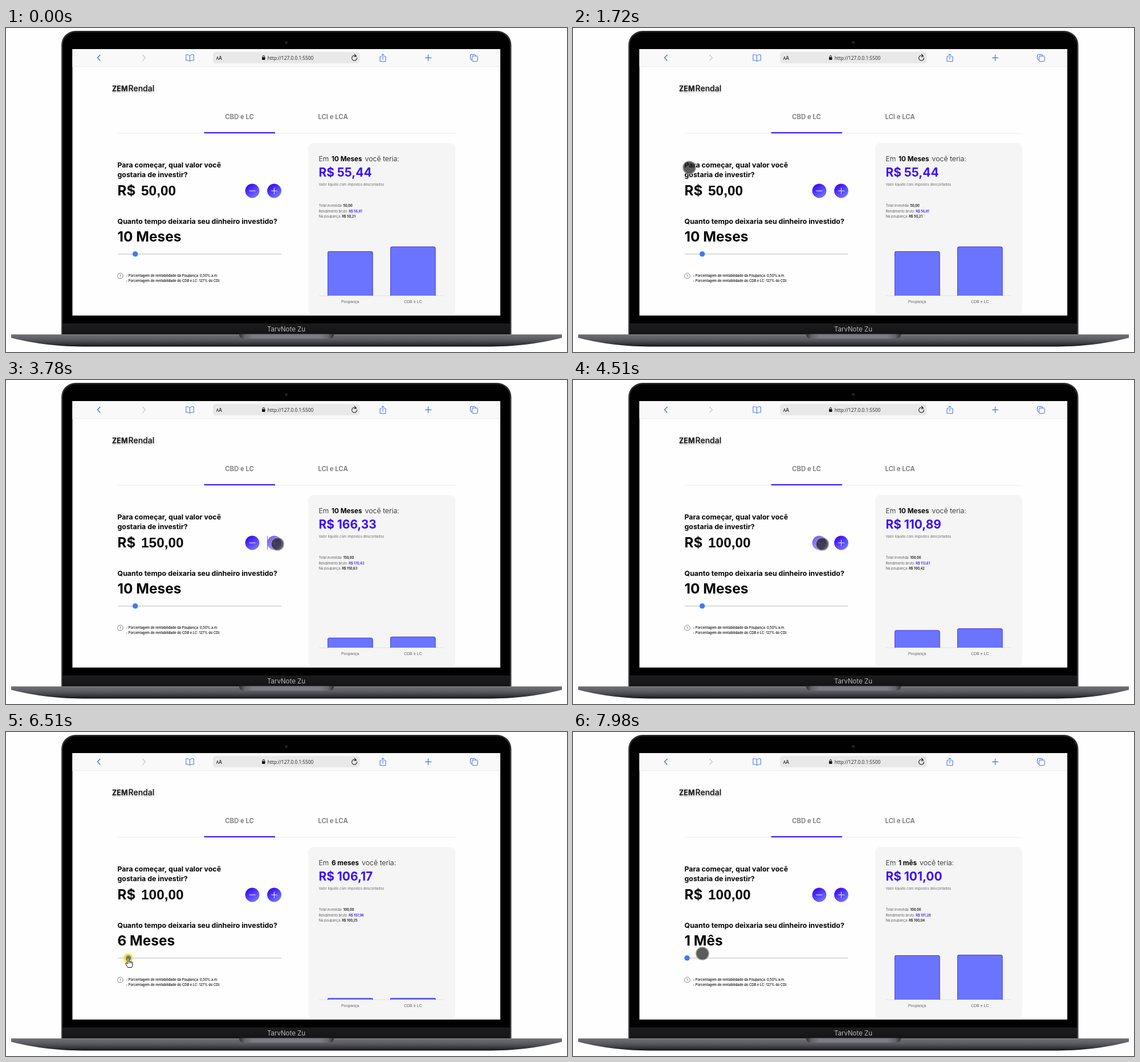
Animation, 984 px wide and 569 px high, one loop 8 s. Source, as an HTML page with a canvas:

```html
<!DOCTYPE html>
<html lang="pt-BR">
<head>
<meta charset="utf-8">
<title>Simulador de investimentos</title>
<style>
  html, body { margin: 0; width: 100%; height: 100%; overflow: hidden; background: #fefefe; }
  canvas { display: block; width: 984px; height: 569px; }
</style>
</head>
<body>
<canvas id="stage" width="984" height="569"></canvas>
<script>
const ctx = document.getElementById('stage').getContext('2d');
const LOOP = 8000;
const VIOLET = '#3c0cff', BLUE = '#3f6fe8', INK = '#050505';
const SANS = 'Inter, sans-serif', ARIAL = '"Liberation Sans", Arial, sans-serif';

// ---------- drawing helpers ----------
function text(str, x, y, size, weight = 400, color = INK, family = SANS, align = 'left') {
  ctx.font = `${weight} ${size}px ${family}`;
  ctx.fillStyle = color;
  ctx.textAlign = align;
  ctx.fillText(str, x, y);
  return x + ctx.measureText(str).width;
}

function box(x, y, w, h, r, fill) {
  ctx.beginPath();
  ctx.roundRect(x, y, w, h, r);
  ctx.fillStyle = fill;
  ctx.fill();
}

function disc(x, y, r, fill) {
  ctx.beginPath();
  ctx.arc(x, y, r, 0, Math.PI * 2);
  ctx.fillStyle = fill;
  ctx.fill();
}

function stroke(path, color, width = 1) {
  ctx.strokeStyle = color;
  ctx.lineWidth = width;
  ctx.stroke(new Path2D(path));
}

function gradient(x0, y0, x1, y1, ...stops) {
  const g = ctx.createLinearGradient(x0, y0, x1, y1);
  stops.forEach(([at, color]) => g.addColorStop(at, color));
  return g;
}

// ---------- timeline ----------
const valueChanges = [[2880, 100], [3720, 150], [4394, 100]];
const DRAG_START = 6150, STEP = 88, FIRST_MONTH = 10;
const HAND_ON = 6000, HAND_OFF = 7900;

// time, x, y
const pointerPath = [
  [190, 923, 542], [1600, 204, 245], [1860, 204, 245], [2600, 490, 300],
  [2780, 476, 288], [3900, 476, 288], [4250, 437, 288], [4850, 437, 288],
  [5560, 234, 400], [5650, 234, 400], [5950, 225, 397], [6150, 225, 397],
  [6942, 201, 397], [7890, 201, 397], [7910, 201, 403], [7975, 227, 389]
];

function pointerAt(t) {
  if (t < pointerPath[0][0]) return null;
  const i = pointerPath.findIndex(p => p[0] > t);
  if (i < 0) return pointerPath.at(-1).slice(1);
  const [t0, x0, y0] = pointerPath[i - 1], [t1, x1, y1] = pointerPath[i];
  const k = (t - t0) / (t1 - t0);
  return [x0 + (x1 - x0) * k, y0 + (y1 - y0) * k];
}

function stateAt(t) {
  let value = 50, chartStart = -1000;
  for (const [at, v] of valueChanges) if (t >= at) { value = v; chartStart = at; }
  const steps = Math.max(0, Math.min(9, Math.floor((t - DRAG_START) / STEP)));
  if (steps) chartStart = DRAG_START + steps * STEP;
  const months = FIRST_MONTH - steps;
  const gross = value * 1.012842 ** months;
  const tax = months > 6 ? 0.2 : 0.225;
  const rest = 1 - Math.min(1, (t - chartStart) / 1000);
  return {
    value, months, gross,
    net: value + (gross - value) * (1 - tax),
    savings: value * (1 + 0.005 / 12) ** months,
    grow: 1 - rest ** 4
  };
}

const money = n => n.toFixed(2).replace('.', ',');
const monthWord = (n, one, many) => `${n} ${n === 1 ? one : many}`;

// ---------- laptop ----------
function drawLaptop() {
  box(97, 5, 789.5, 536, [25, 25, 0, 0], gradient(97, 0, 887, 0,
    [0, '#55555a'], [0.004, '#2a2a2d'], [0.996, '#2a2a2d'], [1, '#55555a']));
  box(99.5, 7.5, 784.5, 533, [23, 23, 0, 0], '#010101');
  disc(491.5, 25.5, 2.8, '#17181c');
  disc(491.5, 25.5, 1.2, '#272a35');
  box(99.5, 519, 784.5, 19, 0, gradient(0, 519, 0, 538, [0, '#1c1c1d'], [1, '#141415']));
  text('TarvNote Zu', 491.5, 532.5, 11.5, 400, '#b9b9bb', SANS, 'center');

  ctx.fillStyle = gradient(0, 538, 0, 559.5, [0, '#8b8b91'], [0.08, '#6b6b72'],
    [0.35, '#5f5f66'], [0.6, '#4a4a51'], [0.85, '#2b2b30'], [1, '#111113']);
  ctx.fill(new Path2D('M9 538H975V544C940 553 900 559 850 559.5H134C84 559 44 553 9 544Z'));
  box(409, 537.5, 166, 8, [0, 0, 7, 7], gradient(409, 0, 575, 0,
    [0, '#2f2f33'], [0.06, '#66666c'], [0.15, '#7c7c83'], [0.85, '#7c7c83'],
    [0.94, '#66666c'], [1, '#2f2f33']));
}

// ---------- browser ----------
function drawToolbar() {
  box(116.5, 37, 750.5, 31, 0, '#f9f9f9');
  box(116.5, 67.5, 750.5, 0.8, 0, '#e6e6e7');
  ctx.lineCap = ctx.lineJoin = 'round';
  stroke('M165 47.5L160.5 52.3L165 57', BLUE, 1.4);
  stroke('M240 47.5L244.5 52.3L240 57', '#c4c4c8', 1.2);
  stroke('M322.5 48.5C320 46.5 317.5 46.7 315.8 47V57C318 56.6 320.5 56.8 322.5 58.3C324.5 56.8 327 56.6 329.2 57V47C327.5 46.7 325 46.5 322.5 48.5V58', BLUE);
  box(363, 42, 257.5, 20, 5, '#e8e8e9');
  text('A', 368.5, 56, 7, 500, '#222');
  text('A', 373, 56, 8.6, 500, '#222');
  box(449, 51.3, 5.6, 4.8, 1, '#111');
  stroke('M450.2 51.3V50.2A1.6 1.8 0 0 1 453.4 50.2V51.3', '#111', 1);
  text('http://127.0.0.1:5500', 458.7, 55.8, 8.3, 400, '#222', '"Open Sans", sans-serif');
  stroke('M614.5 49.8A4.5 4.5 0 1 0 615.6 52.6M611.5 46.2L614.6 49.6L611 50.4', '#222', 1.1);
  stroke('M658.5 50.2H656V58.8H666V50.2H663.5M661 55V46M658.4 48.3L661 45.7L663.6 48.3', BLUE);
  stroke('M735.3 52.3H745.7M740.5 47.1V57.5', BLUE, 1.2);
  stroke('M816.5 55.5H815.6Q814.5 55.5 814.5 54.3V47.9Q814.5 46.6 815.8 46.6H822.2Q823.4 46.6 823.4 47.9V49', BLUE);
  stroke('M819 49.2H825.5Q827.2 49.2 827.2 50.8V57Q827.2 58.6 825.5 58.6H819Q817.4 58.6 817.4 57V50.8Q817.4 49.2 819 49.2Z', BLUE);
}

function drawHeader() {
  ctx.shadowColor = 'rgba(0,0,0,.35)';
  ctx.shadowBlur = 2;
  ctx.shadowOffsetY = 2;
  const end = text('ZEM', 186, 111, 12.5, 700, '#111');
  text('Rendal', end + 1, 111, 14, 500, '#111');
  ctx.shadowColor = 'transparent';

  text('CBD e LC', 409.5, 160, 11.3, 600, '#777', SANS, 'center');
  text('LCI e LCA', 573.5, 160, 11.3, 600, '#777', SANS, 'center');
  box(196, 184.5, 592, 1, 0, '#efefef');
  box(347.5, 183, 124.5, 2, 0, VIOLET);
}

function drawButton(x, y, isPlus, pointer) {
  const hovered = pointer && Math.hypot(pointer[0] - x, pointer[1] - y) < 13;
  ctx.globalAlpha = hovered ? 0.65 : 1;
  disc(x, y, 12.4, gradient(x - 7, y - 9, x + 7, y + 10, [0, '#3d0ff2'], [1, '#7077fb']));
  stroke(`M${x - 5} ${y}H${x + 5}` + (isPlus ? `M${x} ${y - 5}V${y + 5}` : ''), '#f2f0ff', 1);
  ctx.globalAlpha = 1;
  if (hovered && isPlus) stroke(`M${x - 12} 274V298`, '#777', 1);
}

function drawForm(s, t, pointer) {
  text('Para começar, qual valor você', 195.5, 245, 12.4, 700);
  text('gostaria de investir?', 195.5, 262, 12.4, 700);
  text('R$', 195.5, 294, 24.2, 700);
  text(money(s.value), 237, 294, 24.4, 700, INK, ARIAL);
  drawButton(432, 286, false, pointer);
  drawButton(470.5, 286, true, pointer);

  text('Quanto tempo deixaria seu dinheiro investido?', 195.5, 344, 12.4, 700);
  text(monthWord(s.months, 'Mês', 'Meses'), 195.5, 375.3, 24.4, 700);
  box(196, 396, 287, 2, 1, '#d9dcdd');
  const dragging = t >= HAND_ON && t < HAND_OFF;
  if (dragging) disc(pointer[0], pointer[1], 8.5, '#efe758');
  disc(200 + (s.months - 1) * 2.96, 396.9, 4.7, dragging ? '#7d8070' : '#4676f2');

  ctx.beginPath();
  ctx.arc(200.5, 435.3, 4.8, 0, Math.PI * 2);
  ctx.strokeStyle = '#666';
  ctx.lineWidth = 0.8;
  ctx.stroke();
  text('?', 200.5, 437.8, 6.8, 400, '#555', SANS, 'center');
  text('- Porcentagem de rentabilidade da Poupança: 0,50% a.m.', 210.5, 437, 5.85, 500);
  text('- Porcentagem de rentabilidade do CDB e LC: 127% do CDI.', 210.5, 446.3, 5.85, 500);
}

function drawBar(x, height, label) {
  const top = 470 - height, r = Math.min(3, height / 2);
  box(x, top, 79.5, height, [r, r, 0, 0], '#6b74ff');
  stroke(`M${x + 0.5} 470V${top + r}Q${x + 0.5} ${top + 0.5} ${x + r} ${top + 0.5}` +
    `H${x + 79 - r}Q${x + 79} ${top + 0.5} ${x + 79} ${top + r}V470`, '#4b3cea', 1);
  text(label, x + 39.7, 482.7, 7, 400, '#666', ARIAL, 'center');
}

function drawCard(s) {
  box(530, 202, 258, 302, 9, '#f5f5f5');
  text('Em', 548.5, 234, 12, 300, '#111');
  const months = s.months === FIRST_MONTH ? '10 Meses' : monthWord(s.months, 'mês', 'meses');
  const end = text(months, 571, 234, 11.7, 700);
  text('você teria:', end + 5, 234, 12.4, 300, '#111');
  text('R$ ' + money(s.net), 548.5, 261.3, 20.9, 700, VIOLET);
  text('Valor líquido com impostos descontados', 548.5, 277, 6.1, 300, '#444');

  const row = (label, amount, y, color) =>
    text(amount, text(label, 548.5, y, 6, 300, '#333') + 1.5, y, 5.7, 600, color);
  row('Total investida:', money(s.value), 314.2, '#111');
  row('Rendimento bruto:', 'R$ ' + money(s.gross), 323.7, VIOLET);
  row('Na poupança:', 'R$ ' + money(s.savings), 333, '#111');

  box(548.5, 469.7, 219.5, 0.9, 0, '#dcdcdc');
  drawBar(564, 78 * s.grow, 'Poupança');
  drawBar(674, 78 * s.net / s.savings * s.grow, 'CDB e LC');
}

// ---------- pointer ----------
function drawPointer(t, [x, y]) {
  if (t >= HAND_ON && t < HAND_OFF) {
    ctx.save();
    ctx.translate(x, y);
    const hand = new Path2D('M-1.3 0.5Q0 -1.5 1.3 0.5V6Q2.8 4.8 3.8 6.5Q5.2 5.5 6 7Q7.8 6.2 8 8.5V12L6.5 16.5H-0.5L-4 10.5Q-4.8 8.5 -3 8.3L-1.3 10Z');
    ctx.fillStyle = '#fff';
    ctx.fill(hand);
    ctx.strokeStyle = '#111';
    ctx.lineWidth = 1;
    ctx.stroke(hand);
    stroke('M1.3 6V9M3.8 6.5V9M6 7V9.5', '#111', 0.8);
    ctx.restore();
    return;
  }
  disc(x, y, 10.8, 'rgba(24,22,24,.7)');
  ctx.beginPath();
  ctx.arc(x, y, 11.1, 0, Math.PI * 2);
  ctx.strokeStyle = 'rgba(150,150,150,.9)';
  ctx.lineWidth = 1.5;
  ctx.stroke();
}

function draw(t) {
  const state = stateAt(t), pointer = pointerAt(t);
  ctx.fillStyle = '#fefefe';
  ctx.fillRect(0, 0, 984, 569);
  drawLaptop();
  box(116.5, 37, 750.5, 468, 0, '#fefefe');
  drawToolbar();
  drawHeader();
  drawForm(state, t, pointer);
  drawCard(state);
  if (pointer) drawPointer(t, pointer);
}

const begin = performance.now();
(function frame() {
  draw((performance.now() - begin) % LOOP);
  requestAnimationFrame(frame);
})();
</script>
</body>
</html>
```
